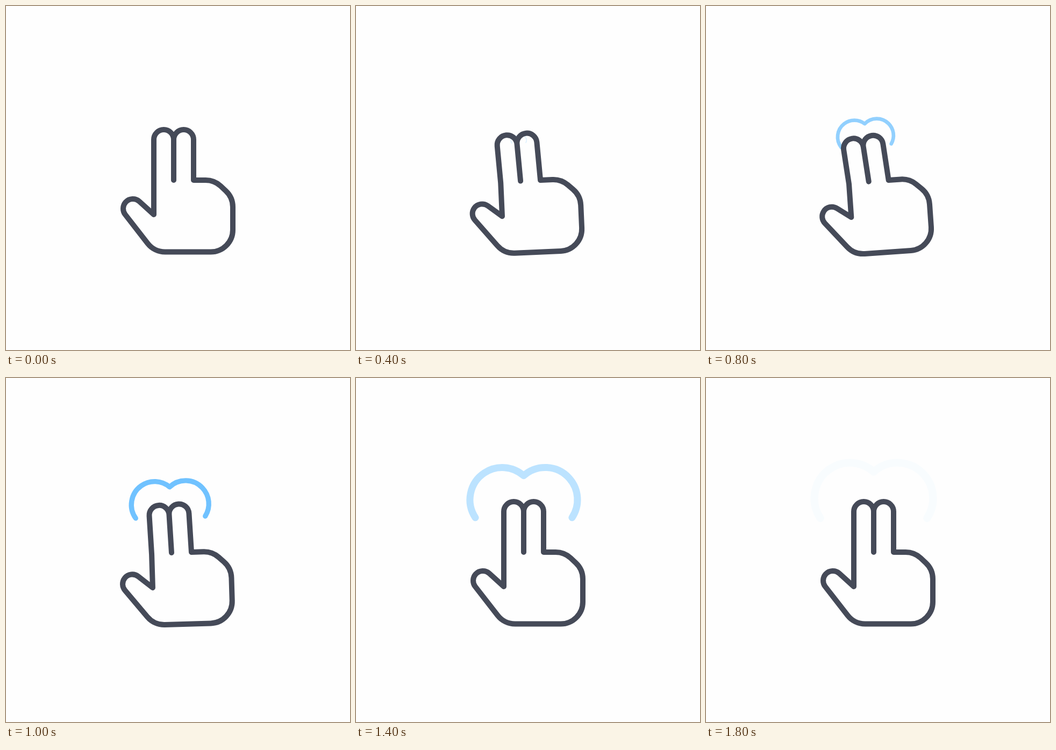
Recreate the animation shown at these times as an HTML page with a canvas. Size 640x640 px, loop 2400 ms.

```html
<!DOCTYPE html>
<html lang="en">
<head>
<meta charset="utf-8">
<title>Two-finger tap</title>
<style>
  html, body { margin: 0; width: 100%; height: 100%; overflow: hidden; background: #fefefe; }
  canvas { display: block; width: 640px; height: 640px; }
</style>
</head>
<body>
<canvas id="stage" width="640" height="640"></canvas>
<script>
const ctx = document.getElementById('stage').getContext('2d');
const LOOP = 2400, STEP = 100, REST_FROM = 1800;
const INK = '#454a58', BLUE = '#6cc0ff';
const PIVOT = { x: 345, y: 457.5 };
const rad = degrees => degrees * Math.PI / 180;
const clamp01 = v => Math.min(1, Math.max(0, v));

// [time, value] keys
const ringScale = [[200, 0], [400, .145], [700, .4], [800, .52], [1000, .72],
                   [1200, .868], [1400, 1], [1800, 1.104]];
const ringAlpha = [[200, 0], [400, .2], [800, .73], [1000, .97],
                   [1200, .84], [1400, .45], [1800, .045]];

function smooth(t, from, to) {
  const u = clamp01((t - from) / (to - from));
  return u * u * (3 - 2 * u);
}

// Smooth curve through the keys (cubic Hermite)
function sample(keys, t) {
  const last = keys.length - 1;
  if (t <= keys[0][0]) return keys[0][1];
  if (t >= keys[last][0]) return keys[last][1];
  const i = keys.findIndex(k => k[0] > t) - 1;
  const slope = n => {
    const a = keys[Math.max(0, n - 1)], b = keys[Math.min(last, n + 1)];
    return (b[1] - a[1]) / (b[0] - a[0]);
  };
  const [t0, v0] = keys[i], [t1, v1] = keys[i + 1];
  const d = t1 - t0, u = (t - t0) / d, w = 1 - u;
  return v0 * (1 + 2 * u) * w * w + v1 * u * u * (3 - 2 * u)
    + d * u * w * (slope(i) * w - slope(i + 1) * u);
}

function drawRing(t, bend) {
  const scale = sample(ringScale, t);
  if (scale <= 0) return;
  ctx.save();
  ctx.translate(312, 251 + 1.2 * bend);
  ctx.scale(scale, scale);
  ctx.globalAlpha = clamp01(sample(ringAlpha, t));
  ctx.strokeStyle = BLUE;
  ctx.lineWidth = 13;
  ctx.beginPath();
  ctx.arc(-40, -24.5, 60, rad(146.3), rad(311.8));
  ctx.arc(40, -24.5, 60, rad(228.2), rad(393.7));
  ctx.stroke();
  ctx.restore();
}

function traceFingers(bend) {
  const r = 18.5, tilt = rad(-4.8) * bend;
  const tip = { x: 312 - 5.5 * bend, y: 248.5 + 10.4 * bend };
  const dx = r * Math.cos(tilt), dy = r * Math.sin(tilt);
  ctx.moveTo(312, 324);
  ctx.lineTo(tip.x, tip.y);
  ctx.moveTo(349, 324);
  for (const side of [1, -1]) {
    ctx.arc(tip.x + side * dx, tip.y + side * dy, r, tilt, tilt + Math.PI, true);
  }
  ctx.lineTo(275, 326);
  ctx.lineTo(275, 388);
}

function traceThumb(bend) {
  const r = 18, x = 236 + 3 * bend, y = 377 + 7.2 * bend;
  const tangent = (px, py, side) =>
    Math.atan2(py - y, px - x) + side * Math.acos(r / Math.hypot(px - x, py - y));
  ctx.arc(x, y, r, tangent(275, 388, -1), tangent(275.8, 457.5, 1), true);
}

function tracePalm() {
  const r = 41;
  ctx.arcTo(275.8, 457.5, 422, 457.5, r);
  ctx.arcTo(422, 457.5, 422, 356, r);
  ctx.arcTo(422, 356, 387.5, 324, r);
  ctx.arcTo(387.5, 324, 349, 324, r);
  ctx.lineTo(349, 324);
}

function drawHand(bend) {
  ctx.strokeStyle = INK;
  ctx.lineWidth = 10;
  ctx.beginPath();
  traceFingers(bend);
  traceThumb(bend);
  tracePalm();
  ctx.stroke();
}

function draw(time) {
  const t = Math.min(REST_FROM, Math.floor(time % LOOP / STEP) * STEP);
  const bend = 1.035 * (smooth(t, 100, 620) - smooth(t, 750, 1200));
  ctx.fillStyle = '#fefefe';
  ctx.fillRect(0, 0, 640, 640);
  ctx.save();
  ctx.lineCap = ctx.lineJoin = 'round';
  ctx.translate(PIVOT.x, PIVOT.y);
  ctx.rotate(rad(-4) * bend);
  ctx.translate(-PIVOT.x, -PIVOT.y);
  drawRing(t, bend);
  drawHand(bend);
  ctx.restore();
}

const start = performance.now();
function tick() {
  draw(performance.now() - start);
  requestAnimationFrame(tick);
}
tick();
</script>
</body>
</html>
```
